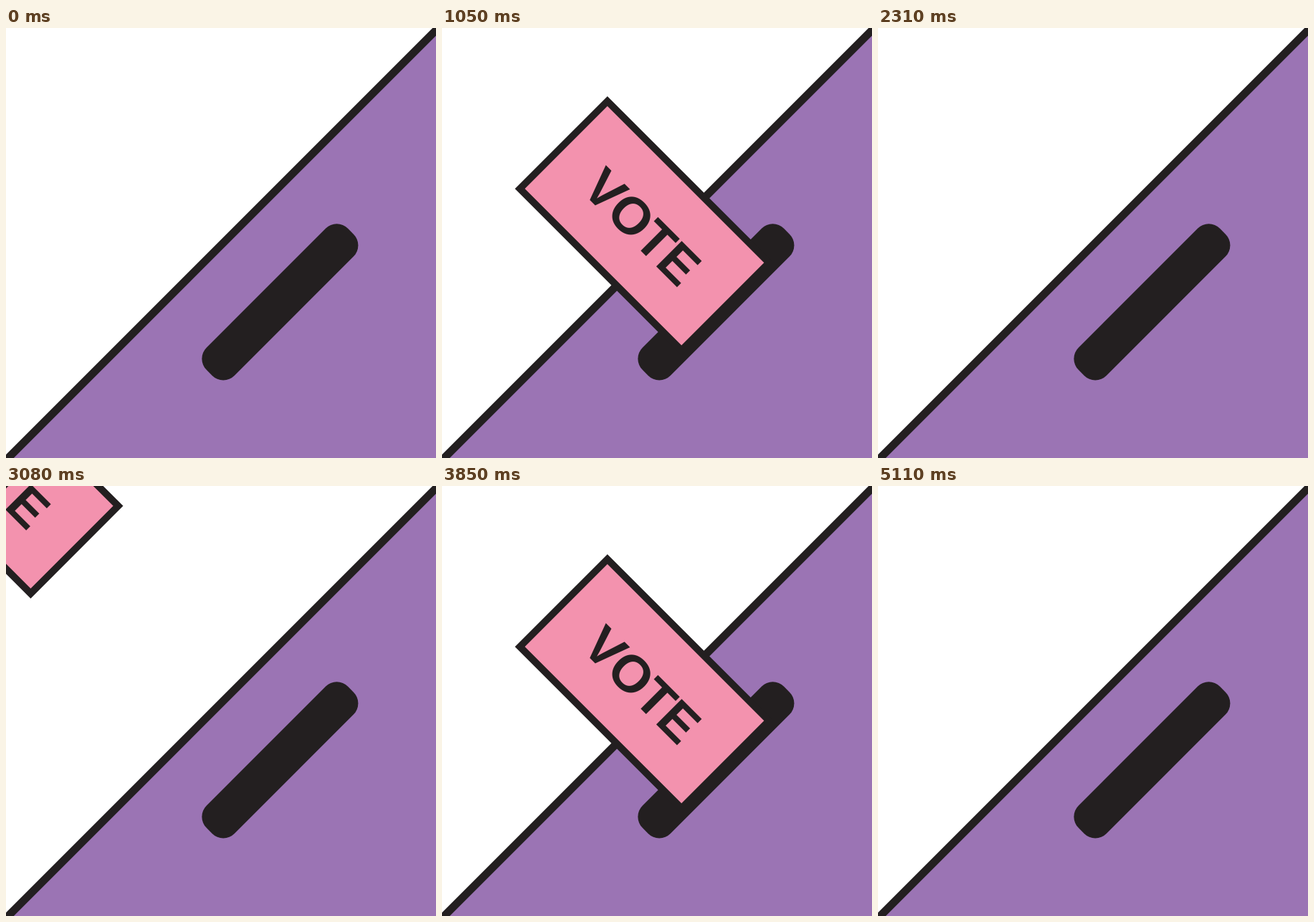
An HTML page with a canvas that plays this animation: 600 by 600 pixels, repeating every 5950 ms.

```html
<!DOCTYPE html>
<html lang="en">
<head>
<meta charset="utf-8">
<title>Ballot box</title>
<style>
  html, body { margin: 0; width: 100%; height: 100%; overflow: hidden; background: #fff; }
  canvas { display: block; width: 600px; height: 600px; }
</style>
</head>
<body>
<canvas id="stage" width="600" height="600"></canvas>
<script>
const ctx = document.getElementById('stage').getContext('2d');

const INK = '#231f20', PURPLE = '#9b74b4', PINK = '#f392ae';
const LOOP = 5950, CYCLE = 2800, STEP = 70;
const REST = 15, LEAVE = 25, GONE = 33;   // steps within one cycle
const SPEED_IN = 27.25 * Math.SQRT2;      // pixels per step along the diagonal
const SPEED_OUT = 29.4 * Math.SQRT2;
const MOUTH = 562.5;                      // the card vanishes past this line

// Everything is drawn in a frame turned by 45 degrees: x runs down the diagonal.
function drawBox() {
  ctx.fillStyle = PURPLE;
  ctx.fillRect(426.4, -500, 500, 1000);
  ctx.fillStyle = INK;
  ctx.fillRect(420.9, -500, 11, 1000);
  ctx.beginPath();
  ctx.roundRect(513.2, -139.5, 55.1, 279, 22);
  ctx.fill();
}

function drawCard(shift) {
  ctx.save();
  ctx.beginPath();
  ctx.rect(-500, -500, MOUTH + 500, 1000);
  ctx.clip();
  ctx.translate(shift, 0);

  ctx.fillStyle = PINK;
  ctx.strokeStyle = INK;
  ctx.lineWidth = 9.8;
  ctx.beginPath();
  ctx.rect(235.4, -91, 318.9, 172.7);
  ctx.fill();
  ctx.stroke();

  ctx.fillStyle = INK;
  ctx.font = 'bold 73px "Liberation Sans", Arial, sans-serif';
  ctx.fontKerning = 'none';
  ctx.letterSpacing = '-1.6px';
  ctx.fillText('VOTE', 296.5, 23.8);
  ctx.restore();
}

function cardShift(n) {
  if (n < REST) return (n - REST) * SPEED_IN;
  return Math.max(0, n - LEAVE) * SPEED_OUT;
}

function draw() {
  const t = performance.now() % LOOP;
  const n = t < 2 * CYCLE ? Math.floor((t % CYCLE) / STEP) : GONE;

  ctx.setTransform(1, 0, 0, 1, 0, 0);
  ctx.fillStyle = '#fff';
  ctx.fillRect(0, 0, 600, 600);
  ctx.rotate(Math.PI / 4);
  drawBox();
  if (n < GONE) drawCard(cardShift(n));
  requestAnimationFrame(draw);
}
draw();
</script>
</body>
</html>
```
